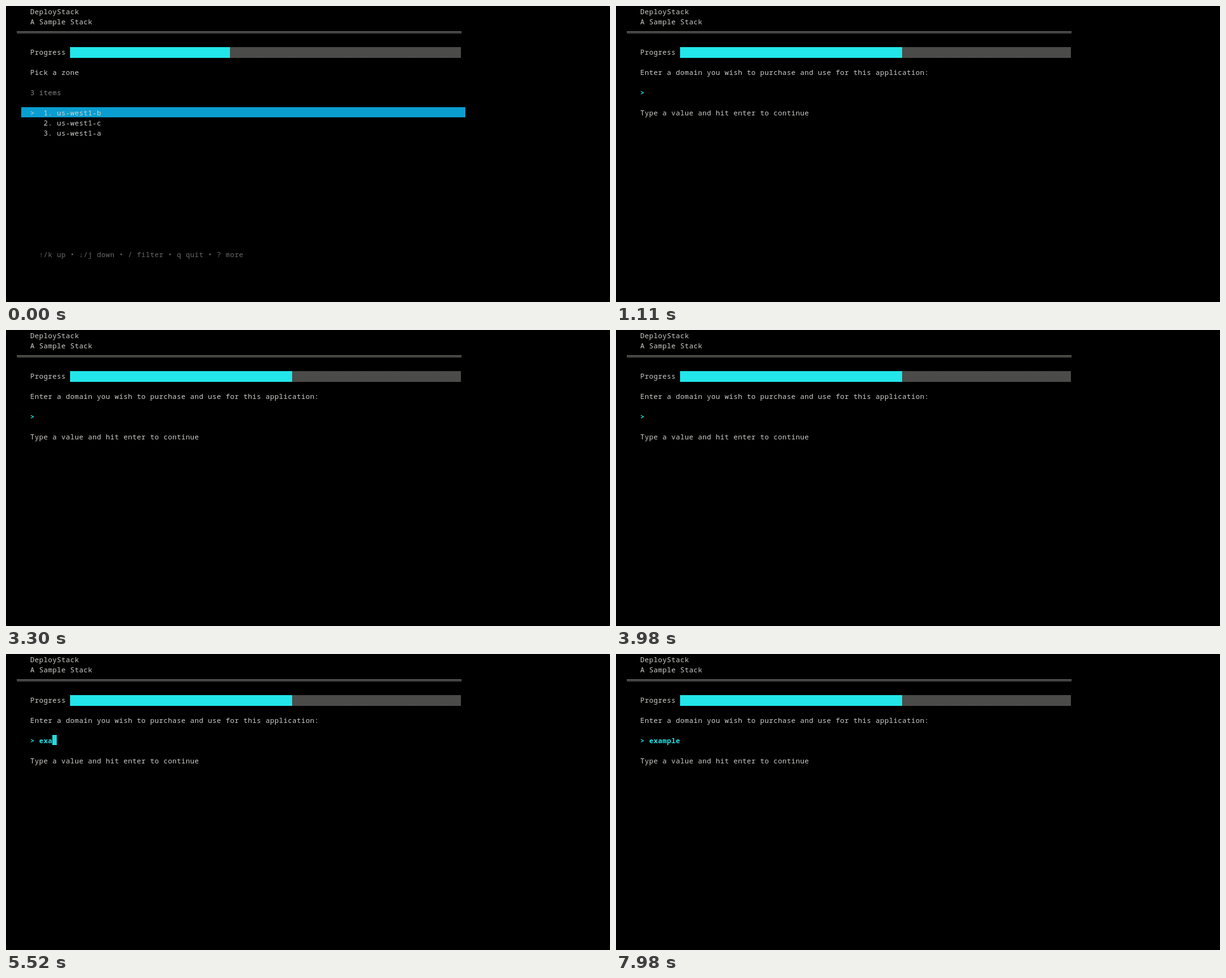
An HTML page with a canvas for the animation above (8000 ms loop, 952 by 468 pixels).

```html
<!DOCTYPE html>
<html lang="en">
<head>
<meta charset="utf-8">
<title>Terminal setup</title>
<style>
  html, body { margin: 0; width: 100%; height: 100%; overflow: hidden; background: #000; }
  canvas { display: block; }
</style>
</head>
<body>
<canvas id="stage" width="952" height="468"></canvas>
<script>
const ctx = document.getElementById('stage').getContext('2d');

const LOOP = 8000, CELL = 7, ROW = 16, LEFT = 3;
const BLINK = 530;
const PROMPT_AT = 135;
const WORD = 'example';
const KEY_TIMES = [4390, 4640, 5350, 5620, 5930, 6130, 6330];

const FAMILY = '11px "Noto Sans Mono", "DejaVu Sans Mono", monospace';
const REGULAR = `400 ${FAMILY}`;
const BOLD = `700 ${FAMILY}`;

const COLOR = {
  text: '#cfcdca', dim: '#858585', help: '#696969', rule: '#858580',
  bar: '#22e6ea', cursor: '#1edce0',
  select: '#0a9ed0', selectText: '#d0d4c4'
};

const colX = col => LEFT + col * CELL;

// Each character is centred in its terminal cell.
function print(text, col, row, color = COLOR.text, font = REGULAR) {
  ctx.fillStyle = color;
  ctx.font = font;
  ctx.textAlign = 'center';
  [...text].forEach((ch, i) => {
    ctx.fillText(ch, colX(col + i) + CELL / 2, row * ROW + 13);
  });
}

function block(col, row, cells, color) {
  ctx.fillStyle = color;
  ctx.fillRect(colX(col), row * ROW, cells * CELL, ROW);
}

function makeShade() {
  const tile = document.createElement('canvas');
  tile.width = tile.height = 2;
  const t = tile.getContext('2d');
  t.fillStyle = '#2a2a29';
  t.fillRect(0, 0, 2, 2);
  t.fillStyle = '#6c6c69';
  t.fillRect(0, 0, 1, 1);
  t.fillRect(1, 1, 1, 1);
  return ctx.createPattern(tile, 'repeat');
}
const shade = makeShade();

function drawHeader(filled) {
  print('DeployStack', 5, 0);
  print('A Sample Stack', 5, 1);
  ctx.fillStyle = COLOR.rule;
  ctx.fillRect(colX(2), 40, 701, 1);
  ctx.fillRect(colX(2), 42, 701, 1);

  print('Progress', 5, 4);
  ctx.fillStyle = shade;
  ctx.fillRect(colX(14), 65, 88 * CELL, 17);
  ctx.fillStyle = COLOR.bar;
  ctx.fillRect(colX(14), 65, filled * CELL, 17);
}

function drawZones() {
  drawHeader(36);
  print('Pick a zone', 5, 6);
  print('3 items', 5, 8, COLOR.dim);
  block(3, 10, 100, COLOR.select);
  print('>  1. us-west1-b', 5, 10, COLOR.selectText);
  print('2. us-west1-c', 8, 11);
  print('3. us-west1-a', 8, 12);
  print('↑/k up • ↓/j down • / filter • q quit • ? more', 7, 24, COLOR.help);
}

function drawPrompt(time) {
  drawHeader(50);
  print('Enter a domain you wish to purchase and use for this application:', 5, 6);
  print('Type a value and hit enter to continue', 5, 10);

  const typed = KEY_TIMES.filter(key => key <= time).length;
  print('>', 5, 8, COLOR.bar, BOLD);
  print(WORD.slice(0, typed), 7, 8, COLOR.bar, BOLD);

  // Each key press shows the cursor and restarts its blink.
  const blinkStart = typed ? KEY_TIMES[typed - 1] : PROMPT_AT;
  if (Math.floor((time - blinkStart) / BLINK) % 2 === 0) {
    block(7 + typed, 8, 1, COLOR.cursor);
  }
}

function frame() {
  const time = performance.now() % LOOP;
  ctx.fillStyle = '#000';
  ctx.fillRect(0, 0, 952, 468);
  if (time < PROMPT_AT) drawZones();
  else drawPrompt(time);
  requestAnimationFrame(frame);
}
frame();
</script>
</body>
</html>
```
